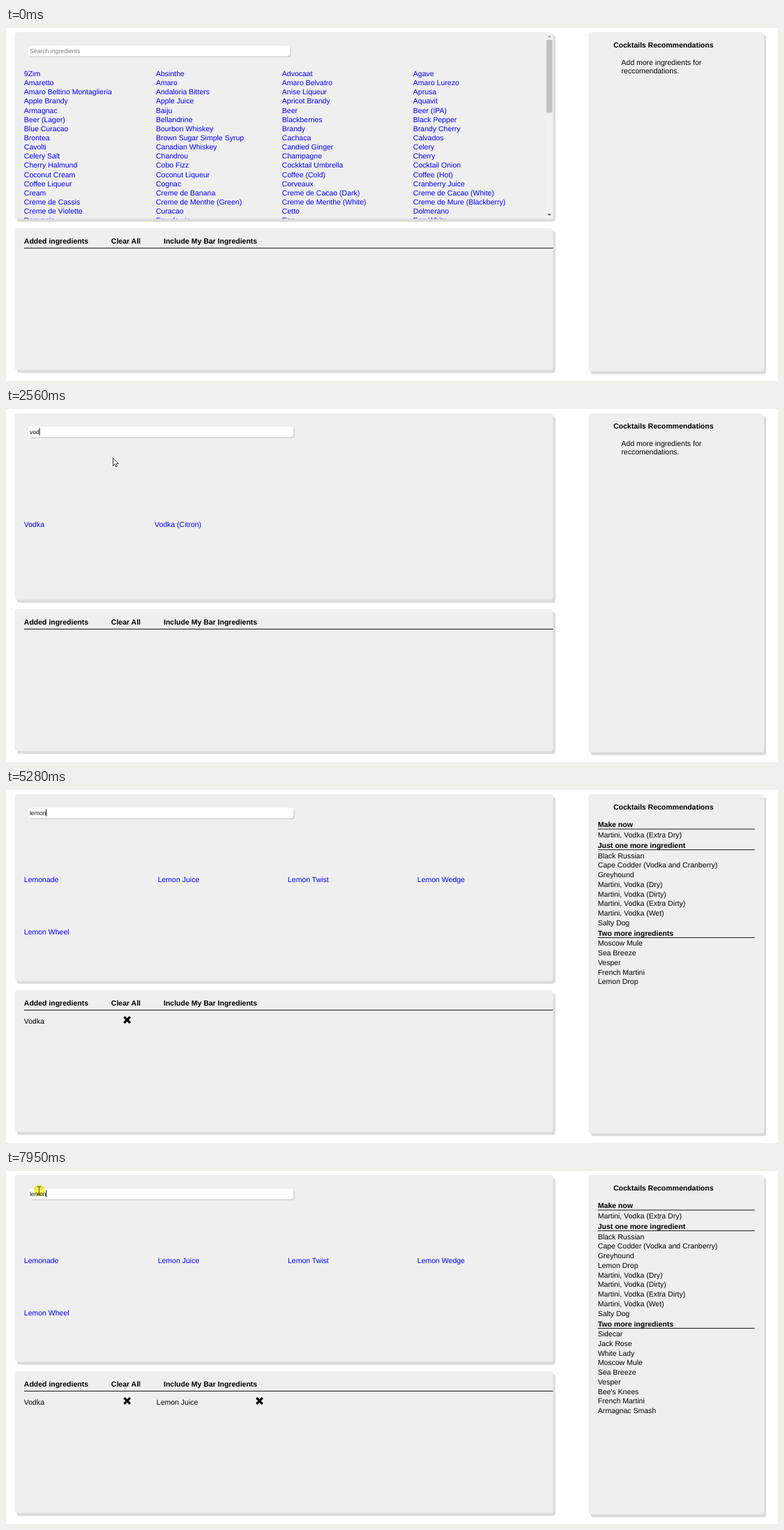
An HTML page that plays this animation: 1107x506 px, repeating every 8 s.

```html
<!DOCTYPE html>
<html lang="en">
<head>
<meta charset="utf-8">
<title>Cocktail finder</title>
<style>
  html, body { margin: 0; width: 100%; height: 100%; overflow: hidden; background: #fff; }
  svg { display: block; width: 1107px; height: 506px; }
  text { font: 10.5px "Liberation Sans", Arial, sans-serif; text-rendering: geometricPrecision; white-space: pre; }
  .bold { font-weight: bold; }
  .link { fill: #00f; }
  .link.hover { fill: #a5a5a5; }
  .field { font-size: 8.7px; }
  .panel { fill: #efefef; }
  .shade { fill: #dbdbdb; }
  .cursor { fill: #fff; stroke: #222; stroke-width: .9; stroke-linejoin: round; }
</style>
</head>
<body>
<svg viewBox="0 0 1107 506" xmlns="http://www.w3.org/2000/svg">
  <clipPath id="clip"><rect x="12.5" y="6" width="772" height="267.5" rx="4"/></clipPath>
  <g id="panels"></g>
  <g id="scrollbar">
    <rect x="774" y="7" width="10.5" height="266" fill="#f1f1f1"/>
    <rect x="775" y="17" width="8.5" height="104.5" fill="#c1c1c1"/>
    <path d="M776.5 13.2l2.7-2.8 2.7 2.8z" fill="#a3a3a3"/>
    <path d="M776.5 266.5l2.7 2.8 2.7-2.8z" fill="#505050"/>
  </g>
  <rect id="inputShade" x="34" y="27" height="15" rx="4" fill="#d8d8d8"/>
  <rect id="input" x="32" y="25.5" height="14.7" rx="4" fill="#fff"/>
  <rect id="selection" x="34" y="27.5" width="14.2" height="10.5" fill="#0078d7"/>
  <text id="typed" class="field" x="33.9" y="35.7"></text>
  <rect id="caret" y="27.3" width=".9" height="10.4"/>
  <g id="lists" clip-path="url(#clip)"></g>
  <g id="fixed"></g>
  <g id="added"></g>
  <g id="recs"></g>
  <circle id="click" r="8" fill="#f6ee4a" style="mix-blend-mode:multiply"/>
  <g id="pointer">
    <path id="arrow" class="cursor" d="M.5.5v11l2.6-2.4 1.7 3.8 1.8-.8-1.7-3.7h3.4z"/>
    <path id="hand" class="cursor" d="M-1.1 9V1.1a1.1 1.1 0 0 1 2.2 0V5.4q1.2-.9 2 .3 1.2-.7 1.9.5 1.5-.4 1.7 1V10q0 2-1.3 3.5v1.8H-.9V14Q-2.5 12-4 9.2-4.4 7.600-3 7.800-2 8-1.1 9zM1.100 5.400V8M3.100 5.700V8M5 6.200V8"/>
    <path id="beam" class="cursor" style="fill:none;stroke:#444" d="M-2.600-5.500H-.8Q0-5.500 0-4.700V4.700Q0 5.500-.8 5.500H-2.600M2.600-5.500H.8Q0-5.500 0-4.700M2.600 5.500H.8Q0 5.500 0 4.700"/>
  </g>
</svg>
<script>
const LOOP = 8000;
const $ = id => document.getElementById(id);
const show = (el, on) => { el.style.display = on ? '' : 'none'; };

function add(parent, tag, attrs, content) {
  const el = document.createElementNS('http://www.w3.org/2000/svg', tag);
  for (const key in attrs) el.setAttribute(key, attrs[key]);
  if (content) el.textContent = content;
  parent.appendChild(el);
  return el;
}
// y is the middle of the capitals
const label = (parent, x, y, str, cls = '') =>
  add(parent, 'text', { x, y: y + 3.8, class: cls }, str);
const rule = (parent, x1, x2, y) =>
  add(parent, 'rect', { x: x1, y: y - .45, width: x2 - x1, height: .9 });

for (const [x, y, width, height] of [[12.5, 6, 772, 267.5], [12.5, 287, 772, 203.3], [835.2, 6, 251.6, 486]]) {
  add($('panels'), 'rect', { x: x + 3.3, y: y + 4.3, width, height, rx: 4, class: 'shade' });
  add($('panels'), 'rect', { x, y, width, height, rx: 4, class: 'panel' });
}
label($('fixed'), 25.8, 305.4, 'Added ingredients', 'bold');
label($('fixed'), 150.8, 305.4, 'Clear All', 'bold');
label($('fixed'), 226, 305.4, 'Include My Bar Ingredients', 'bold');
label($('fixed'), 871, 24.4, 'Cocktails Recommendations', 'bold');
rule($('fixed'), 26, 784.5, 315.5);

const ALL = `9Zim|Absinthe|Advocaat|Agave|Amaretto|Amaro|Amaro Belvatro|Amaro Lurezo
Amaro Beltino Montaglieria|Andaloria Bitters|Anise Liqueur|Aprusa|Apple Brandy|Apple Juice|Apricot Brandy|Aquavit
Armagnac|Baiju|Beer|Beer (IPA)|Beer (Lager)|Bellandrine|Blackberries|Black Pepper
Blue Curacao|Bourbon Whiskey|Brandy|Brandy Cherry|Brontea|Brown Sugar Simple Syrup|Cachaca|Calvados
Cavolti|Canadian Whiskey|Candied Ginger|Celery|Celery Salt|Chandrou|Champagne|Cherry
Cherry Halmund|Cobo Fizz|Cockktail Umbrella|Cocktail Onion|Coconut Cream|Coconut Liqueur|Coffee (Cold)|Coffee (Hot)
Coffee Liqueur|Cognac|Corveaux|Cranberry Juice|Cream|Creme de Banana|Creme de Cacao (Dark)|Creme de Cacao (White)
Creme de Cassis|Creme de Menthe (Green)|Creme de Menthe (White)|Creme de Mure (Blackberry)|Creme de Violette|Curacao|Cetto|Dolmerano
Dorwenie|Eau de vie|Egg|Egg White`;
const V = 'Creme de Violette|Vermouth (Bianco)|Vermouth (Dry)|Vermouth (Sweet)|Vodka|Vodka (Citron)';
const L = `Amaro Lurezo|Anise Liqueur|Beer (Lager)|Coconut Liqueur|Coffee Liqueur|Elderflower Liqueur|Lemonade|Lemon Juice
Lemon Twist|Lemon Wedge|Lemon Wheel|Lorvel Blanc|Lime Juice|Lime Twist|Lime Wedge|Lime Wheel
Luvezzi Maraschino Liqueur|Raspberry Liqueur|Nell's Lime Juice`;
const LEMON = 'Lemonade|Lemon Juice|Lemon Twist|Lemon Wedge|Lemon Wheel';

// Filtered rows are spread evenly over the panel; the full list scrolls.
function makeList(start, names, cols, scrolls) {
  const group = add($('lists'), 'g', {});
  const items = names.split(/[|\n]/);
  const gap = scrolls ? 13.13 : 226.5 / (Math.ceil(items.length / 4) + 1);
  const top = scrolls ? 65.3 : 52.2 + gap;
  const cells = items.map((name, i) => {
    const x = cols[i % 4], y = top + gap * Math.floor(i / 4);
    return { x, y, right: cols[i % 4 + 1] || 771, half: scrolls ? 6.5 : 7, el: label(group, x, y, name, 'link') };
  });
  return { start, group, cells };
}
const lists = [
  makeList(0, ALL, [25.8, 215, 395.8, 583.8], true),
  makeList(1550, V, [25.8, 217, 412, 591]),
  makeList(1930, 'Vodka|Vodka (Citron)', [25.8, 213]),
  makeList(4450, L, [25.8, 252.3, 436, 614.5]),
  makeList(4510, LEMON, [25.8, 217.7, 404, 589.8])
];

function makeRecs(start, sections) {
  const group = add($('recs'), 'g', {});
  let y = 49.4;
  for (const [title, names] of sections) {
    label(group, 848.7, y, title, 'bold');
    rule(group, 848.5, 1073.5, y + 6.6);
    y += 14.6;
    for (const name of names.split('|')) {
      label(group, 848.7, y, name);
      y += 13.75;
    }
    y += 1.35;
  }
  return { start, group };
}
const dry = 'Martini, Vodka (Extra Dry)';
const martinis = 'Martini, Vodka (Dry)|Martini, Vodka (Dirty)|Martini, Vodka (Extra Dirty)|Martini, Vodka (Wet)|Salty Dog';
const easy = 'Black Russian|Cape Codder (Vodka and Cranberry)|Greyhound|';
const recs = [
  { start: 0, group: add($('recs'), 'g', {}) },
  makeRecs(3500, [['Make now', dry], ['Just one more ingredient', easy + martinis],
    ['Two more ingredients', 'Moscow Mule|Sea Breeze|Vesper|French Martini|Lemon Drop']]),
  makeRecs(7170, [['Make now', dry], ['Just one more ingredient', easy + 'Lemon Drop|' + martinis],
    ['Two more ingredients', "Sidecar|Jack Rose|White Lady|Moscow Mule|Sea Breeze|Vesper|Bee's Knees|French Martini|Armagnac Smash"]])
];
label(recs[0].group, 882.3, 49.4, 'Add more ingredients for');
label(recs[0].group, 882.3, 61.4, 'reccomendations.');

const added = [[3500, 'Vodka', 25.8, 173.7], [7170, 'Lemon Juice', 215.8, 363.5]].map(([start, name, x, cross]) => {
  const group = add($('added'), 'g', {});
  label(group, x, 331.6, name);
  add(group, 'path', { d: `M${cross - 4.3} 325.200l8.600 8.600m0-8.600l-8.600 8.600`, stroke: '#000', 'stroke-width': 3.2 });
  return { start, group };
});

const typing = [[0, ''], [1550, 'v'], [1930, 'vo'], [2160, 'vod'], [4450, 'l'], [4510, 'le'], [4590, 'lem'], [5050, 'lemo'], [5280, 'lemon']]
  .map(([start, str]) => ({ start, str }));

// first step, last step, steps, start, control point, end, ease-out power
const moves = [
  [70, 670, 9, [979, 485], [500, 130], [102, 44], 2],
  [820, 920, 2, [99, 39], [98, 37], [96, 35], 1],
  [2560, 2950, 6, [153, 70], [100, 130], [36, 158], 1],
  [3250, 3250, 1, [39, 162], [39, 162], [39, 162], 1],
  [3500, 4050, 8, [41, 162], [74.5, 36], [45, 33], 1],
  [6140, 6460, 5, [47, 27], [60, 90], [187, 134], 1],
  [6540, 6940, 6, [205, 132], [225, 130], [236, 128], 1],
  [7320, 7950, 9, [232, 112], [200, 40], [47.5, 28], 1]
].map(([start, end, steps, a, b, c, power]) => ({ start, end, steps, a, b, c, power }));

const shown = [[70, 1550], [2560, 4450], [6140, LOOP]];
const clicks = [[1090, 1150], [3420, 3500], [4220, 4370], [7090, 7170], [7950, LOOP]];
const caretOn = [[1090, 3420], [4450, 5830], [6380, 7090], [7950, LOOP]];
const selected = [[4290, 4450]];

const within = (spans, t) => spans.some(([from, to]) => t >= from && t < to);
const latest = (list, t) => list.filter(e => t >= e.start).pop();

function pointerAt(t) {
  const m = latest(moves, t);
  if (!m || !within(shown, t)) return null;
  const last = m.steps - 1;
  const step = last ? Math.min(last, Math.floor((t - m.start) / (m.end - m.start) * last + 1e-6)) : 1;
  const u = 1 - (1 - step / (last || 1)) ** m.power;
  return [0, 1].map(i => (1 - u) ** 2 * m.a[i] + 2 * u * (1 - u) * m.b[i] + u * u * m.c[i]);
}

function render(t) {
  const list = latest(lists, t), rec = latest(recs, t);
  for (const l of lists) show(l.group, l === list);
  for (const r of recs) show(r.group, r === rec);
  for (const a of added) show(a.group, t >= a.start);

  const full = list === lists[0], { str } = latest(typing, t);
  show($('scrollbar'), full);
  $('input').setAttribute('width', full ? 375 : 380);
  $('inputShade').setAttribute('width', full ? 375 : 380);

  const picked = within(selected, t), typed = $('typed');
  typed.textContent = str || 'Search ingredients';
  typed.setAttribute('fill', picked ? '#fff' : str ? '#111' : '#757575');
  show($('selection'), picked);
  show($('caret'), within(caretOn, t));
  $('caret').setAttribute('x', 33.6 + (str ? typed.getComputedTextLength() : 0));

  const p = pointerAt(t);
  let hovered = false;
  for (const c of list.cells) {
    const on = !!p && p[1] < 273 && p[0] >= c.x && p[0] < c.right && Math.abs(p[1] - c.y) <= c.half;
    c.el.classList.toggle('hover', on);
    hovered = hovered || on;
  }
  show($('pointer'), p);
  show($('click'), p && within(clicks, t));
  if (!p) return;
  const [x, y] = p;
  const inField = x > 32 && x < 412 && y > 25 && y < 40.5;
  show($('beam'), inField);
  show($('hand'), hovered);
  show($('arrow'), !inField && !hovered);
  for (const id of ['pointer', 'click']) $(id).setAttribute('transform', `translate(${x} ${y})`);
}

const began = performance.now();
function tick() {
  render((performance.now() - began) % LOOP);
  requestAnimationFrame(tick);
}
tick();
</script>
</body>
</html>
```
